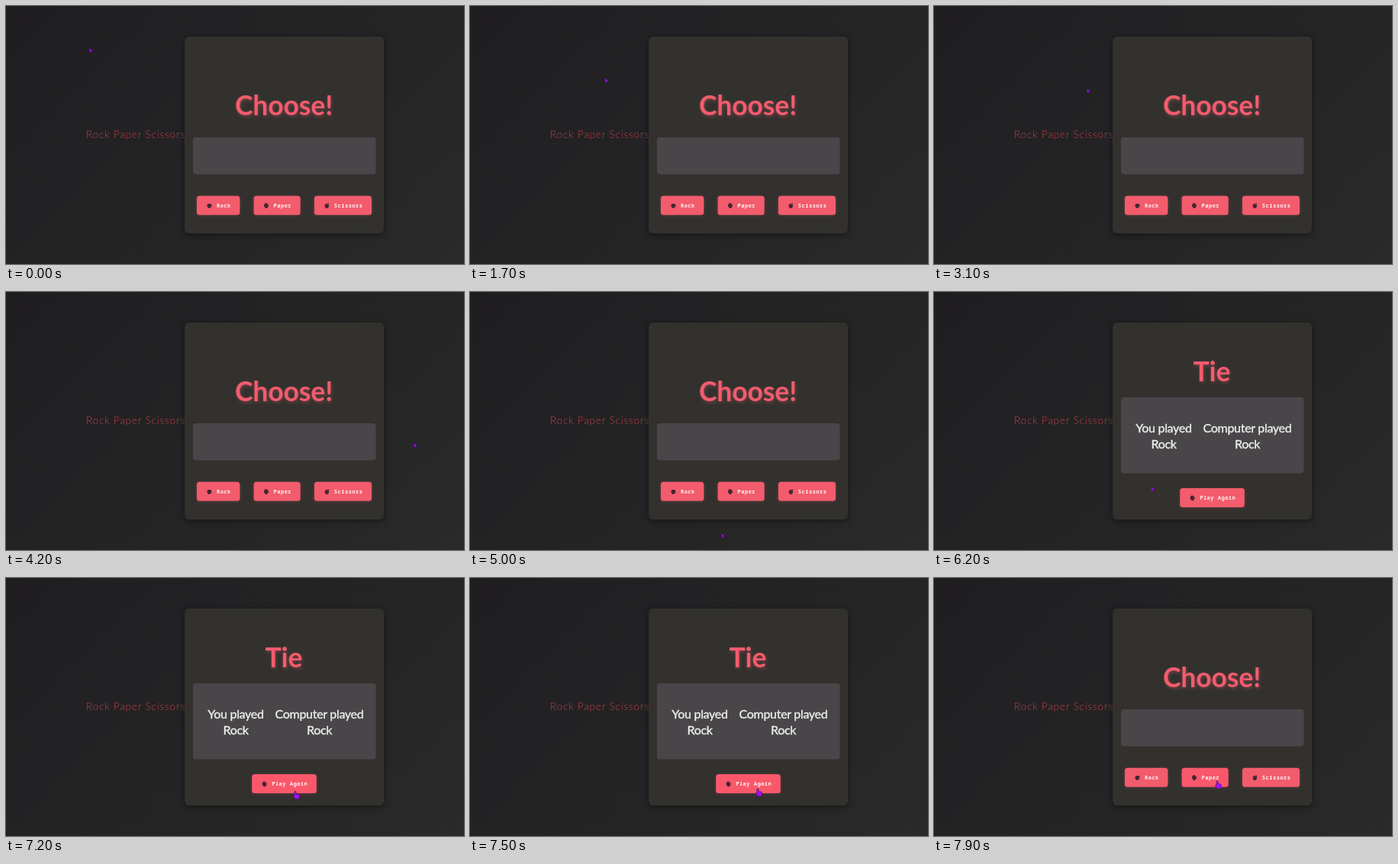
These frames come from a looping animation (600x338 px, 8000 ms). An HTML page:

```html
<!DOCTYPE html>
<html lang="en">
<head>
<meta charset="utf-8">
<title>Rock Paper Scissors</title>
<style>
  html, body { margin: 0; width: 100%; height: 100%; overflow: hidden; background: #252426; }
  svg { display: block; width: 100vw; height: 100vh; }
  text { font-family: Lato, "Open Sans", sans-serif; }
  .brand { font-size: 13.5px; font-weight: 300; letter-spacing: .82px; fill: #b8434a; }
  .card { fill: #32312e; filter: drop-shadow(0 2px 4px rgba(0, 0, 0, .45)); }
  .panel { fill: #494649; }
  .heading { font-size: 35.5px; font-weight: 700; letter-spacing: -.1px; fill: #f25c6e;
    text-anchor: middle; filter: drop-shadow(1px 2px 2px rgba(242, 92, 110, .35)); }
  .played { font-size: 16px; letter-spacing: -.3px; fill: #eeeeec; stroke: #eeeeec;
    stroke-width: .4px; text-anchor: middle; }
  .button rect { fill: #f25c6c; filter: drop-shadow(0 1.5px 2.5px rgba(242, 92, 108, .2)); }
  .button.hover rect { fill: #f9586b; }
  .button text { font: 600 7px "Noto Sans Mono", "DejaVu Sans Mono", monospace;
    letter-spacing: .5px; fill: #fff4f4; }
  .icon { fill: #45262d; stroke: #45262d; stroke-linejoin: round; }
  .cursor path { fill: #a512ee; stroke: #3a1068; stroke-width: .6; stroke-linejoin: round; }
</style>
</head>
<body>
<svg viewBox="0 0 600 338" preserveAspectRatio="none">
  <defs>
    <linearGradient id="night" gradientUnits="userSpaceOnUse" x1="65" y1="-66" x2="535" y2="404">
      <stop offset="0" stop-color="#1f1d20"/>
      <stop offset="1" stop-color="#2a2a2a"/>
    </linearGradient>
    <path id="rock" class="icon" d="M-2 -2H2L2.5 1L1 2.6H-1.5L-2.6 .5Z"/>
    <path id="paper" class="icon" d="M-2 -2.4L0 -3L2.4 -1L2 1.4L.8 3H-1L-2.8 .2Z"/>
    <path id="scissors" class="icon" d="M-1.3 -2.6L0 -.8L1.6 -3L2.3 .6L1.2 2.8H-1.2L-2.4 .6Z"/>
  </defs>
  <rect width="600" height="338" fill="url(#night)"/>
  <text class="brand" x="105" y="173">Rock Paper Scissors</text>
  <rect class="card" x="234" y="40" width="261" height="258" rx="6"/>
  <g id="choose">
    <text class="heading" x="364" y="143">Choose!</text>
    <rect class="panel" x="245" y="172" width="239.5" height="48.5" rx="4"/>
  </g>
  <g id="result">
    <text class="heading" x="364" y="117">Tie</text>
    <rect class="panel" x="245" y="138" width="239.5" height="99.5" rx="4"/>
    <text class="played" x="301" y="184">You played</text>
    <text class="played" x="301" y="205">Rock</text>
    <text class="played" x="410.5" y="184">Computer played</text>
    <text class="played" x="410.5" y="205">Rock</text>
  </g>
  <g class="cursor" id="cursor">
    <path id="arrow" d="M0 0L5 4.2L3 4.6L1.2 6.4Z"/>
    <path id="hand" d="M0 .8Q1 -.4 2 .8L2.3 4L5.6 4.6Q6.8 5 6.5 6.6L5.8 10.5H1.2L-1.6 6.8Q-1.8 5.4 -.1 6Z"/>
  </g>
</svg>
<script>
const LOOP = 8000, STEP = 100;
const RESULT_FROM = 6200, RESULT_TO = 7600;
const CENTER = 364.5, GAP = 18.2, BUTTON_HEIGHT = 25;
const byId = id => document.getElementById(id);

const origin = { x: 109, y: 55 };
const moves = [
  { from: 1300, until: 1900, x: 200, y: 108 },
  { from: 3700, until: 3800, x: 497, y: 247 },
  { from: 4000, until: 5000, x: 329, y: 316, bend: { x: 705, y: -22 } },
  { from: 5000, until: 5800, x: 284, y: 255 },
  { from: 6400, until: 7200, x: 378, y: 279 },
  { from: 7300, until: 7900, x: 370, y: 265.5 }
];

// Lays out a centred row of buttons, each as wide as its label needs
function addRow(view, y, items) {
  const widths = items.map(([, label]) => 37.6 + 4.7 * label.length);
  const total = widths.reduce((sum, width) => sum + width, GAP * (items.length - 1));
  let left = CENTER - total / 2;
  return items.map(([icon, label], i) => {
    const x = left, width = widths[i];
    left += width + GAP;
    const group = document.createElementNS("http://www.w3.org/2000/svg", "g");
    group.setAttribute("class", "button");
    group.innerHTML = `<rect x="${x}" y="${y}" width="${width}" height="${BUTTON_HEIGHT}" rx="3.5"/>
      <use href="#${icon}" x="${x + 16.5}" y="${y + 12.9}"/>
      <text x="${x + 26}" y="${y + 15.4}">${label}</text>`;
    byId(view).append(group);
    return { group, view, x, y, width };
  });
}

const buttons = [
  ...addRow("choose", 248.7, [["rock", "Rock"], ["paper", "Paper"], ["scissors", "Scissors"]]),
  ...addRow("result", 257, [["paper", "Play Again"]])
];

const smooth = p => p * p * (3 - 2 * p);
const mix = (a, b, p) => a + (b - a) * p;
const between = (a, b, p) => ({ x: mix(a.x, b.x, p), y: mix(a.y, b.y, p) });

function pointerAt(time) {
  let place = origin;
  for (const move of moves) {
    if (time <= move.from) break;
    const p = smooth(Math.min(1, (time - move.from) / (move.until - move.from)));
    place = move.bend
      ? between(between(place, move.bend, p), between(move.bend, move, p), p)
      : between(place, move, p);
  }
  return place;
}

const show = (id, visible) => { byId(id).style.display = visible ? "" : "none"; };

function draw(time) {
  const view = time >= RESULT_FROM && time < RESULT_TO ? "result" : "choose";
  show("choose", view === "choose");
  show("result", view === "result");

  const { x, y } = pointerAt(time);
  const over = buttons.find(button => button.view === view
    && x >= button.x && x <= button.x + button.width
    && y >= button.y && y <= button.y + BUTTON_HEIGHT);
  for (const button of buttons) button.group.classList.toggle("hover", button === over);
  show("arrow", !over);
  show("hand", over);
  byId("cursor").setAttribute("transform", `translate(${x} ${y})`);
}

const start = performance.now();
function tick() {
  const time = (performance.now() - start) % LOOP;
  draw(Math.floor(time / STEP) * STEP);
  requestAnimationFrame(tick);
}
tick();
</script>
</body>
</html>
```
